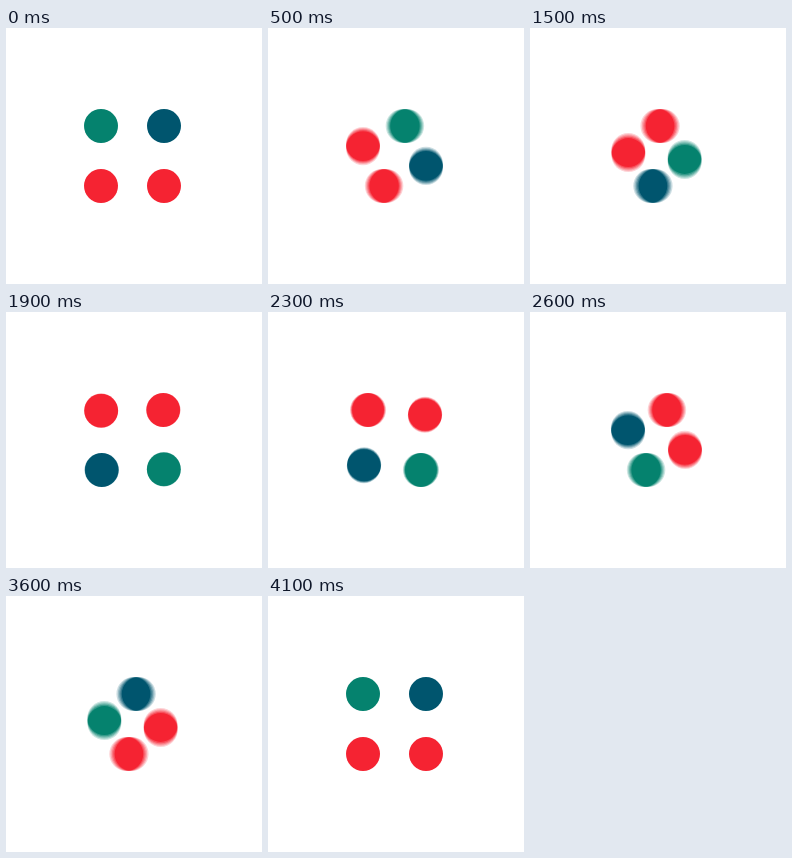
An HTML page with a canvas that plays this animation: 256 px wide and 256 px high, repeating every 4200 ms.

```html
<!DOCTYPE html>
<html lang="en">
<head>
<meta charset="utf-8">
<title>Four dots</title>
<style>
  html, body { margin: 0; width: 100%; height: 100%; overflow: hidden; background: #fff; }
  canvas { display: block; }
</style>
</head>
<body>
<canvas id="stage" width="256" height="256"></canvas>
<script>
const ctx = document.getElementById('stage').getContext('2d');

const LOOP = 4200, STEP = LOOP / 4, MOVE = 960, TICK = 100;
const RADIUS = 17, BEND = 3.4;
const SHUTTER = 36, SAMPLES = 5;

// Clockwise from top left; each dot starts on the corner with its index.
const corners = [[95, 98], [158, 98], [158, 158], [95, 158]];
const colors = ['#04826e', '#02566f', '#f72534', '#f72534'];

const mix = (a, b, p) => a + (b - a) * p;

// cubic-bezier(.5, 0, .35, 1), solved by bisection
function ease(x) {
  if (x <= 0 || x >= 1) return x <= 0 ? 0 : 1;
  let low = 0, high = 1;
  for (let i = 0; i < 24; i++) {
    const s = (low + high) / 2, r = 1 - s;
    if (1.5 * s * r * r + 1.05 * s * s * r + s * s * s < x) low = s;
    else high = s;
  }
  return low * low * (3 - 2 * low);
}

function drawDots(time) {
  const t = (time + LOOP) % LOOP;
  const step = Math.floor(t / STEP);
  const p = ease((t % STEP) / MOVE);
  colors.forEach((color, i) => {
    const side = (i + step) % 4;
    const [x0, y0] = corners[side];
    const [x1, y1] = corners[(side + 1) % 4];
    // After the first step the vertical sides bow slightly inwards.
    const bow = step > 0 && side % 2 ? BEND * 4 * p * (1 - p) : 0;
    ctx.fillStyle = color;
    ctx.beginPath();
    ctx.arc(mix(x0, x1, p) + (side === 1 ? -bow : bow), mix(y0, y1, p), RADIUS, 0, Math.PI * 2);
    ctx.fill();
  });
}

// Motion blur: equal shares of several moments add up to full opacity.
function render(time) {
  ctx.clearRect(0, 0, 256, 256);
  ctx.globalCompositeOperation = 'lighter';
  ctx.globalAlpha = 1 / SAMPLES;
  for (let i = 0; i < SAMPLES; i++) {
    drawDots(time + SHUTTER * (i / (SAMPLES - 1) - 0.5));
  }
}

const start = performance.now();
function frame() {
  const elapsed = (performance.now() - start) % LOOP;
  render(Math.floor(elapsed / TICK) * TICK);
  requestAnimationFrame(frame);
}
frame();
</script>
</body>
</html>
```
